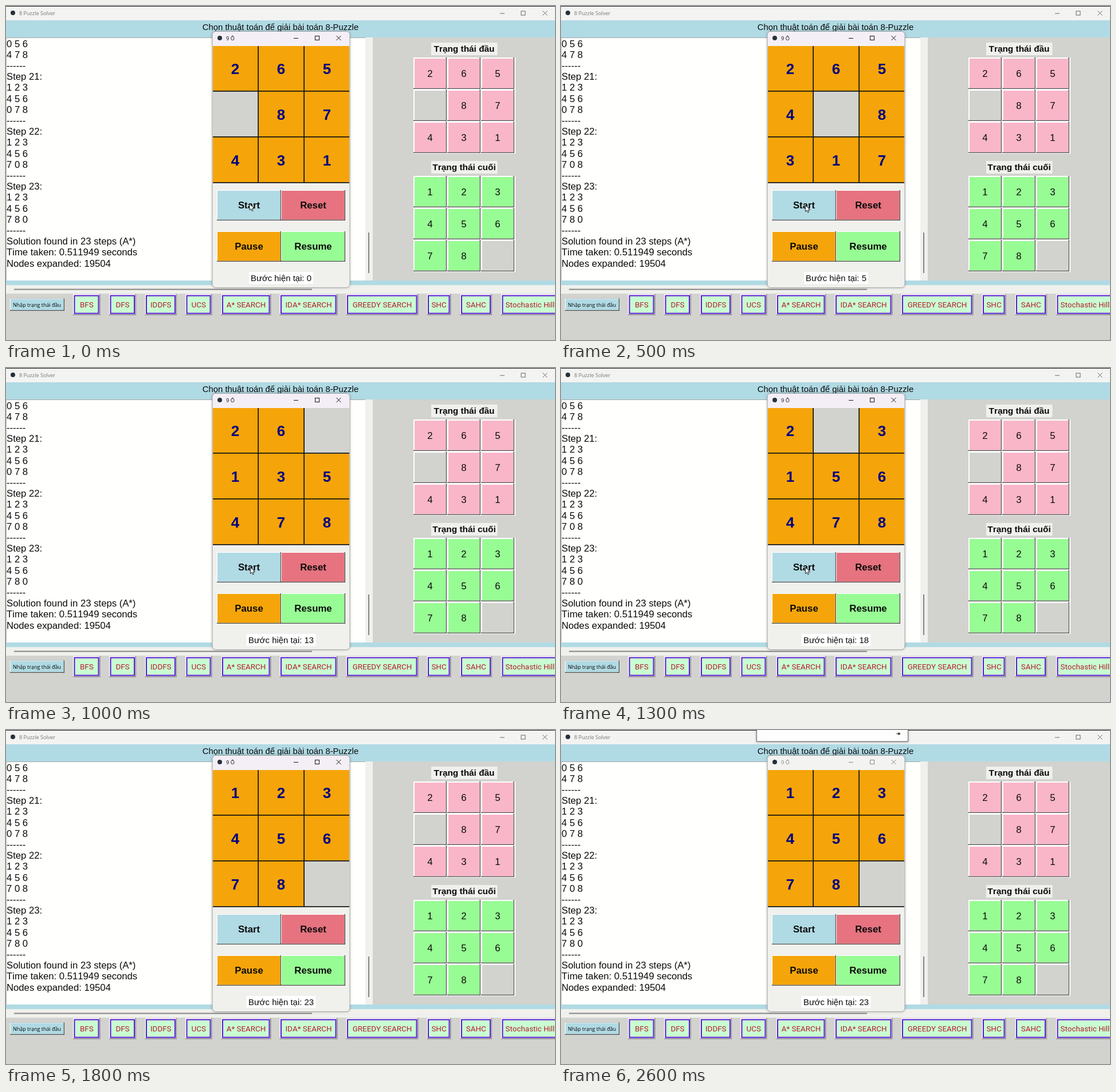
An HTML page with a canvas for the animation above (2700 ms loop, 958 by 584 pixels).

```html
<!DOCTYPE html>
<html lang="vi">
<head>
<meta charset="utf-8">
<title>8 Puzzle Solver</title>
<style>
html, body { margin: 0; width: 100%; height: 100%; overflow: hidden; }
canvas { display: block; }
</style>
</head>
<body>
<canvas id="stage" width="958" height="584"></canvas>
<script>
const LOOP = 2700, STEP_MS = 62.5, FIRST_STEP = 147;
const c = document.getElementById('stage').getContext('2d');
c.fontKerning = 'none';

const BLUE = '#b0dae4', GREY = '#d2d3cf', PANEL = '#f0f0ed', ORANGE = '#f5a509',
      PINK = '#f9b6c9', GREEN = '#98fc94', RED = '#e6737f', WHITE = '#fff', INK = '#0a0a0a';
const ARIAL = '"Liberation Sans", Arial, sans-serif';
const UI = '"Open Sans", sans-serif';
const ROBOTO = 'Roboto, sans-serif';

const LOG = ['0 5 6', '4 7 8', '------',
  'Step 21:', '1 2 3', '4 5 6', '0 7 8', '------',
  'Step 22:', '1 2 3', '4 5 6', '7 0 8', '------',
  'Step 23:', '1 2 3', '4 5 6', '7 8 0', '------',
  'Solution found in 23 steps (A*)', 'Time taken: 0.511949 seconds', 'Nodes expanded: 19504'];

// label, left, right
const ALGORITHMS = [['BFS', 117, 164.5], ['DFS', 180, 227], ['IDDFS', 242.5, 298], ['UCS', 313, 359.5],
  ['A* SEARCH', 375.5, 462.5], ['IDA* SEARCH', 477.5, 578.5], ['GREEDY SEARCH', 593.5, 719.5],
  ['SHC', 734.5, 776.5], ['SAHC', 792.5, 848], ['Stochastic Hill Climbing', 864, 1020]];

// Every board along the solution, from the blank's moves
const START = '265087431', GOAL = '123456780';
const SHIFT = { U: -3, D: 3, L: -1, R: 1 };
const boards = [START];
for (const move of 'DRRULDLURDRUULDRULLDDRR') {
  const cells = [...boards.at(-1)];
  const blank = cells.indexOf('0'), next = blank + SHIFT[move];
  [cells[blank], cells[next]] = [cells[next], '0'];
  boards.push(cells.join(''));
}

function box(x, y, w, h, color) {
  c.fillStyle = color;
  c.fillRect(x, y, w, h);
}

function text(s, x, y, size, { font = ARIAL, color = INK, align = 'center', weight = 400 } = {}) {
  c.font = `${weight} ${size}px ${font}`;
  c.fillStyle = color;
  c.textAlign = align;
  c.fillText(s, x, y);
}

function raised(x, y, w, h, face, light = 1, dark = 1.5) {
  box(x, y, w, h, '#4c4c4c');
  box(x, y, w - dark, h - dark, WHITE);
  box(x + light, y + light, w - light - dark, h - light - dark, face);
}

function dot(x, y) {
  c.fillStyle = '#27313a';
  c.beginPath();
  c.arc(x, y, 4, 0, 7);
  c.fill();
}

function controls(y, xs, r, color) {
  const [min, max, close] = xs;
  c.strokeStyle = color;
  c.lineWidth = 1;
  c.strokeRect(max - r + 0.5, y - r + 0.5, 2 * r - 1, 2 * r - 1);
  c.beginPath();
  c.moveTo(min - 4, y + 0.5);
  c.lineTo(min + 4, y + 0.5);
  c.moveTo(close - r, y - r);
  c.lineTo(close + r, y + r);
  c.moveTo(close + r, y - r);
  c.lineTo(close - r, y + r);
  c.stroke();
}

function miniBoard(title, board, y, color) {
  box(742, y - 26, 115.5, 22, PANEL);
  text(title, 799.5, y - 10, 15.4, { weight: 700 });
  box(711, y, 178, 168, WHITE);
  [...board].forEach((n, i) => {
    const x = 711 + i % 3 * 59, top = y + Math.floor(i / 3) * 56;
    raised(x, top, 58, 55, n === '0' ? GREY : color, 2);
    if (n !== '0') text(n, x + 29, top + 33.5, 16.7);
  });
}

function mainWindow() {
  box(0, 0, 958, 584, GREY);
  box(0, 0, 958, 25, '#f3f3f2');
  box(0, 0, 958, 1, '#202124');
  dot(12, 12);
  text('8 Puzzle Solver', 23, 16, 9.1, { font: UI, color: '#777', align: 'left' });
  controls(12.5, [866, 902.5, 940.5], 4, '#666');

  box(0, 25, 958, 463, BLUE);
  text('Chọn thuật toán để giải bài toán 8-Puzzle', 479, 42, 14.85);
  box(0, 55, 627, 425, '#fffffd');
  box(0, 55, 627, 1, '#a5a9aa');
  box(0, 55, 1, 425, '#b5b8b8');
  LOG.forEach((line, i) => text(line, 1, 71.5 + i * 19.2, 16.7, { align: 'left' }));
  box(627, 55, 13, 425, PANEL);
  box(632, 396, 2, 71, '#858585');
  box(640, 55, 318, 425, GREY);
  miniBoard('Trạng thái đầu', START, 90, PINK);
  miniBoard('Trạng thái cuối', GOAL, 297, GREEN);

  box(0, 488, 958, 15, PANEL);
  box(14, 494.5, 520, 2, '#858585');
  raised(7, 511.5, 95, 21.5, BLUE);
  text('Nhập trạng thái đầu', 54, 525.5, 9, { font: UI });
  for (const [label, left, right] of ALGORITHMS) {
    box(left, 503.5, right - left, 37, '#8b8b8b');
    box(left, 503.5, right - left - 1.5, 35.5, WHITE);
    box(left + 1.5, 505.5, right - left - 3.5, 33, '#5a18d2');
    box(left + 3.5, 507.5, right - left - 7.5, 29, '#c9fdd2');
    const clipped = right > 958;
    text(label, clipped ? 871.5 : (left + right) / 2, 527, 13.4,
      { font: ROBOTO, color: '#b51c2c', align: clipped ? 'left' : 'center' });
  }
}

function solverWindow(step, active) {
  c.save();
  c.shadowColor = 'rgba(0,0,0,.25)';
  c.shadowBlur = 5;
  c.beginPath();
  c.roundRect(360, 44, 240, 448.5, 6);
  c.fillStyle = PANEL;
  c.fill();
  c.restore();

  c.save();
  c.clip();
  box(360, 44, 240, 26, active ? '#f4eff6' : '#f3f3f2');
  box(361, 70, 238, 239, ORANGE);
  [...boards[step]].forEach((n, i) => {
    const x = 360 + i % 3 * 80, y = 69 + Math.floor(i / 3) * 80;
    if (n === '0') box(Math.max(x, 361), Math.max(y, 70), Math.min(80, 599 - x), 80, GREY);
    else text(n, x + 40, y + 49.5, 26, { weight: 700, color: '#000080' });
  });
  for (const d of [80, 160, 240]) {
    box(361, 68 + d, 238, 1.7, '#111');
    if (d < 240) box(359.3 + d, 70, 1.7, 239, '#111');
  }
  c.restore();
  c.strokeStyle = '#a3a3a3';
  c.lineWidth = 1;
  c.beginPath();
  c.roundRect(360, 44.5, 240, 448, 6);
  c.stroke();

  dot(373, 56);
  text('9 Ô', 384, 59.5, 9.2, { font: UI, color: active ? INK : '#808080', align: 'left' });
  controls(56, [506, 543, 580.5], 4, active ? '#111' : '#888');

  const button = (label, x, y, color) => {
    raised(x, y, 112, 53, color);
    text(label, x + 56, y + 32, 16.8, { weight: 700 });
  };
  button('Start', 368, 322, BLUE);
  button('Reset', 480, 322, RED);
  button('Pause', 368, 394, ORANGE);
  button('Resume', 480, 394, GREEN);

  const w = step < 10 ? 112 : 121;
  box(480 - w / 2, 465, w, 21, WHITE);
  text('Bước hiện tại: ' + step, 480, 480.5, 14.9);
}

function cursor(x, y) {
  c.save();
  c.translate(x, y);
  c.beginPath();
  [[0, 0], [0, 11], [2.5, 8.7], [4.2, 12.6], [6, 11.8], [4.4, 8], [8, 8]].forEach(p => c.lineTo(...p));
  c.closePath();
  c.fillStyle = WHITE;
  c.fill();
  c.strokeStyle = '#111';
  c.lineWidth = 0.9;
  c.stroke();
  c.restore();
}

function toolbar() {
  c.save();
  c.shadowColor = 'rgba(0,0,0,.4)';
  c.shadowBlur = 4;
  box(341, -2, 265, 22.5, '#6b6b6b');
  c.restore();
  box(342, 0, 263, 19.5, '#fdfdfd');
  box(585, 6, 3, 1, '#444');
  box(588, 4, 1, 5, '#444');
  box(589, 5, 3, 3, '#444');
}

function draw(t) {
  const step = Math.min(23, Math.max(0, Math.floor((t - FIRST_STEP) / STEP_MS)));
  const ending = t >= 2600;
  mainWindow();
  solverWindow(step, !ending);
  if (t < 200) cursor(425, 346);
  else if (t < 1700) cursor(426.5, 348.5);
  if (ending) toolbar();
}

const begin = performance.now();
function tick() {
  draw((performance.now() - begin) % LOOP);
  requestAnimationFrame(tick);
}
tick();
</script>
</body>
</html>
```
